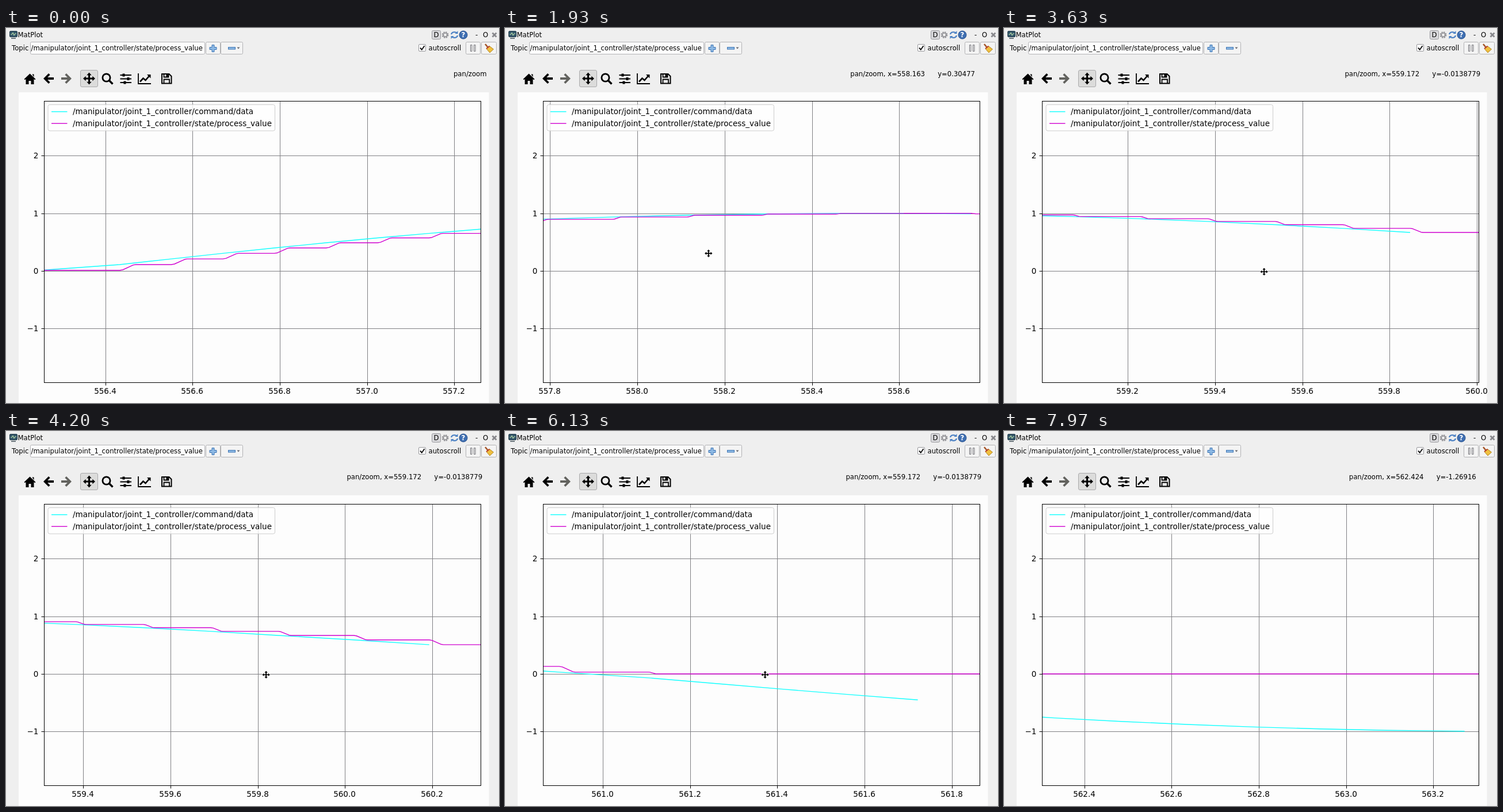
These frames come from a looping animation (857x653 px, 8 s). An HTML page:

```html
<!DOCTYPE html>
<html lang="en">
<head>
<meta charset="utf-8">
<title>MatPlot</title>
<style>
  html, body { margin: 0; width: 100%; height: 100%; overflow: hidden; background: #efefef; }
  svg { display: block; width: 857px; height: 653px; font: 11.65px "DejaVu Sans", sans-serif; }
  text { white-space: pre; }
  .plot { font-size: 13.5px; }
  .btn { fill: #f4f4f4; stroke: #b2b2b4; }
  .mid { text-anchor: middle; }
  .end { text-anchor: end; }
  .line { fill: none; stroke-width: 1.4; stroke-linejoin: round; }
  .cmd { stroke: #11ffff; }
  .val { stroke: #d000d0; }
  .grid { stroke: #808084; fill: none; }
  .axis { stroke: #000; fill: none; }
</style>
</head>
<body>
<svg viewBox="0 0 857 653">
  <defs>
    <clipPath id="area"><rect x="66" y="127" width="760" height="491"/></clipPath>
    <path id="move" d="M0-10.5L4.2-5.8H1.5V-1.5H5.8V-4.2L10.5 0L5.8 4.2V1.5H1.5V5.8H4.2L0 10.5L-4.2 5.8H-1.5V1.5H-5.8V4.2L-10.5 0L-5.8-4.2V-1.5H-1.5V-5.8H-4.2Z"/>
    <path id="arrow" d="M-9 0L0-9L2.6-6.4L-1.8-2H9V2H-1.8L2.6 6.4L0 9Z"/>
  </defs>
  <rect width="857" height="653" fill="#efefef"/>

  <!-- title bar -->
  <rect x="6.5" y="5.5" width="13" height="10" rx="1.5" fill="#35576b" stroke="#203a48"/>
  <path d="M8 11h2.5l1.5-3 2 5 1.5-3H18" fill="none" stroke="#c9efb0"/>
  <path d="M9 18h8" stroke="#4c5a62" stroke-width="1.6"/>
  <text x="20.5" y="16">MatPlot</text>
  <rect x="740.5" y="4.5" width="15" height="15" rx="2" fill="#d9d9dc" stroke="#98989c"/>
  <text class="mid" x="748" y="16.3">D</text>
  <g fill="none" stroke="#929296">
    <circle cx="763.5" cy="12" r="4.8" stroke-width="2.2" stroke-dasharray="2.4 1.37"/>
    <circle cx="763.5" cy="12" r="3.2" stroke-width="1.6"/>
  </g>
  <path d="M774 11a5.5 5 0 0 1 9.5-2.2M785 13a5.5 5 0 0 1-9.5 2.2" fill="none" stroke="#4d82c4" stroke-width="2.2"/>
  <path d="M785.5 5v5h-5zM773.5 19v-5h5z" fill="#4d82c4"/>
  <circle cx="795" cy="12" r="7" fill="#3f6fb2" stroke="#264f8c"/>
  <text class="mid" x="795" y="16.3" fill="#fff" font-weight="bold">?</text>
  <text class="mid" x="818" y="16">-</text>
  <text class="mid" x="833.5" y="16">O</text>
  <path d="M845.5 8.5l7 7m0-7l-7 7" stroke="#88888c" stroke-width="2.8"/>

  <!-- topic row -->
  <text x="10" y="39">Topic</text>
  <rect x="42.5" y="24.5" width="303" height="21" rx="2" fill="#fdfdfd" stroke="#b2b2b6"/>
  <text x="43.5" y="38.5">/manipulator/joint_1_controller/state/process_value</text>
  <rect class="btn" x="347.5" y="24.5" width="25" height="21" rx="2"/>
  <path d="M358 29.5h4v4h4v4h-4v4h-4v-4h-4v-4h4z" fill="#8db9e4" stroke="#3d74b4"/>
  <rect class="btn" x="373.5" y="24.5" width="38" height="21" rx="2"/>
  <rect x="386.5" y="33.5" width="12" height="3.5" fill="#8db9e4" stroke="#3d74b4"/>
  <path d="M401.5 33.5h5l-2.5 3z" fill="#66666a"/>
  <rect x="717.5" y="28.5" width="12" height="12" rx="1.5" fill="#fdfdfd" stroke="#98989c"/>
  <path d="M720 34.5l2.8 3.2L727.5 31" fill="none" stroke="#111" stroke-width="1.9"/>
  <text x="734.5" y="38.5">autoscroll</text>
  <rect class="btn" x="799.5" y="24.5" width="25" height="21" rx="2"/>
  <path d="M807.5 29.5h2.5v11h-2.5zM813.5 29.5h2.5v11h-2.5z" fill="#e8e8ea" stroke="#77777b"/>
  <rect class="btn" x="826.5" y="24.5" width="26" height="21" rx="2"/>
  <path d="M833 28l5 6" stroke="#a4562a" stroke-width="2.6"/>
  <path d="M835 36l5.5-4.5 7 5.5-6.5 6z" fill="#f0c040" stroke="#b08420"/>
  <path d="M835 36l5.5-4.5" stroke="#b8402c" stroke-width="2"/>

  <!-- plot toolbar -->
  <path d="M41.5 79.5L51.5 89l-1.3 1.3L48.5 89v9h-5v-6h-4v6h-5v-9l-1.7 1.3L31.5 89zM45.5 80.5h3v5z"/>
  <use href="#arrow" x="74" y="88"/>
  <use href="#arrow" transform="translate(105 88) scale(-1 1)" fill="#62625e"/>
  <rect x="129.5" y="73.5" width="30" height="29" rx="2.5" fill="#dcdcdb" stroke="#a9a9ab"/>
  <use href="#move" x="144.5" y="88"/>
  <g fill="none" stroke="#000">
    <circle cx="174.5" cy="86.5" r="6.6" stroke-width="2.8"/>
    <path d="M179.5 91.5l6 6" stroke-width="3.4"/>
    <path d="M198.5 82h19.5M198.5 88.5h19.5M198.5 95h19.5" stroke-width="2"/>
    <path d="M204.5 79.5v5M212.5 86v5M206.5 92.5v5" stroke-width="4"/>
    <path d="M230 79v18h22" stroke-width="1.8"/>
    <path d="M233 93.5l5.5-6 4 3.5 6.5-7.5" stroke-width="2.6"/>
    <path d="M271 80h12.5l4 4v12.5h-16.5z" stroke-width="2"/>
    <path d="M274.5 80v5.5h8V80M274.5 96v-6.5h9.5V96" stroke-width="1.8"/>
  </g>
  <path d="M245 81h6.5v6.5z"/>
  <rect x="278.5" y="80" width="4" height="5"/>
  <text id="status" class="end" x="835.5" y="84"></text>

  <!-- figure -->
  <rect x="22" y="112" width="817.5" height="541" fill="#fdfdfd"/>
  <g class="plot">
    <g id="rows"></g>
    <g clip-path="url(#area)">
      <path id="cols" class="grid"/>
      <path id="cmd" class="line cmd"/>
      <path id="val" class="line val"/>
    </g>
    <path id="ticks" class="axis"/>
    <rect class="axis" x="66.5" y="127.5" width="759" height="490"/>
    <g id="labels"></g>
    <rect x="73" y="133.5" width="394.5" height="45.5" rx="3" fill="#fff" fill-opacity=".8" stroke="#ccc"/>
    <path class="line cmd" d="M79 145.7h27.5"/>
    <path class="line val" d="M79 166.2h27.5"/>
    <text x="116" y="150.3">/manipulator/joint_1_controller/command/data</text>
    <text x="116" y="170.5">/manipulator/joint_1_controller/state/process_value</text>
  </g>
  <use id="cursor" href="#move" stroke="#fff" stroke-width="2.2" paint-order="stroke"/>
</svg>
<script>
const LOOP = 8000, REPAINT = 210;
const LEFT = 66.8, SPAN = 758.5, ZERO = 423, UNIT = 100.35, BOTTOM = -1.93;
const ENTER = 1300, REST = 3200, RESUME = 6400, LEAVE = 7800, GONE = 7930;
const $ = id => document.getElementById(id);
const py = v => ZERO - v * UNIT;
const snap = p => Math.round(p) + .5;

// key points: [ms, newest time on the axis]
const clock = [[-170, 557.2606], [830, 557.955], [1930, 558.7846], [REST, 559.664],
  [3630, 560.0043], [4870, 560.9246], [6130, 561.864], [7970, 563.304]];

// key points: [ms, fraction of axis width, data y]
const pointer = [[ENTER, .02, -2.3], [1930, .3784, .30477], [2000, .3784, .30477],
  [REST, .508, -.0138779], [RESUME, .508, -.0138779], [LEAVE, .28, -1.26916],
  [GONE, .2, -2.5]];

// key points: [command number, arrival time]
const pace = [[0, 556.25], [1, 556.433], [8, 557.2606], [15, 558.455], [24, 559.847],
  [26, 560.193], [30, 560.695], [32, 561.105], [36, 561.722], [45, 563.093], [47, 563.45]];

const segment = (keys, t) => {
  const i = keys.findIndex(k => k[0] > t);
  return i < 0 ? keys.length - 2 : Math.max(0, i - 1);
};

function sample(keys, t) {
  const i = segment(keys, t), a = keys[i], b = keys[i + 1];
  const k = Math.min(1, Math.max(0, (t - a[0]) / (b[0] - a[0])));
  return a.slice(1).map((v, j) => v + (b[j + 1] - v) * k);
}

// the axis advances in equal steps of about REPAINT ms between two key points
function rightEdge(t) {
  const i = segment(clock, t), [t0, r0] = clock[i], [t1, r1] = clock[i + 1];
  const steps = Math.round((t1 - t0) / REPAINT);
  const k = Math.min(1, Math.floor((t - t0) / (t1 - t0) * steps + 1e-6) / steps);
  return r0 + (r1 - r0) * k;
}

// a sampled sine; the joint follows each sample with a short ramp and stops at 0
const commands = Array.from({ length: 48 }, (_, n) => [sample(pace, n)[0], Math.sin(n / 10 + .01)]);

const toPath = pts => 'M' + pts.map(([x, v]) => x.toFixed(2) + ' ' + py(v).toFixed(2)).join('L');

function drawPlot(right) {
  const px = s => LEFT + (s - right + 1) * SPAN;
  const seen = commands.filter(c => c[0] <= right + 1e-6);
  let level = seen[0][1];
  const val = [[px(seen[0][0]), level]];
  for (const [s, v] of seen) {
    const goal = Math.max(0, v), d = goal - level;
    if (!d) continue;
    const dur = .01 + .27 * Math.abs(d);
    for (const [k, e] of [[0, 0], [.2, .1], [.85, .93], [1, 1]])
      val.push([px(s + k * dur), level + e * d]);
    level = goal;
  }
  val.push([LEFT + SPAN + 40, level]);
  $('cmd').setAttribute('d', toPath(seen.map(([s, v]) => [px(s), v])));
  $('val').setAttribute('d', toPath(val));

  let cols = '', ticks = '', labels = '';
  for (let n = Math.ceil((right - 1) * 5); n <= right * 5; n++) {
    const x = snap(px(n / 5));
    cols += `M${x} 127V617`;
    ticks += `M${x} 618v4.5`;
    labels += `<text class="mid" x="${x - 1}" y="637">${(n / 5).toFixed(1)}</text>`;
  }
  for (let v = -1; v <= 2; v++) ticks += `M66 ${snap(py(v))}h-4.5`;
  $('cols').setAttribute('d', cols);
  $('ticks').setAttribute('d', ticks);
  $('labels').innerHTML = labels;
}

function drawPointer(t) {
  const [fx, y] = sample(pointer, t);
  $('cursor').setAttribute('visibility', t >= ENTER && t < GONE ? 'visible' : 'hidden');
  $('cursor').setAttribute('transform',
    `translate(${LEFT + fx * SPAN} ${py(y)}) scale(.64)`);

  // the readout only follows while the pointer moves
  const m = t < RESUME ? Math.min(t, REST) : Math.min(t, LEAVE);
  const [mx, my] = sample(pointer, m);
  const pad = v => String(Number(v.toPrecision(6))).padEnd(12, '\u00a0');
  $('status').textContent = t >= ENTER && my > BOTTOM
    ? `pan/zoom, x=${pad(rightEdge(m) - 1 + mx)}\u00a0y=${pad(my)}` : 'pan/zoom';
}

for (let v = -1; v <= 2; v++) {
  const y = snap(py(v));
  $('rows').innerHTML += `<path class="grid" d="M66 ${y}H825"/>` +
    `<text class="end" x="56.3" y="${y + 4.5}">${String(v).replace('-', '\u2212')}</text>`;
}

const start = performance.now();
let painted;
function tick() {
  const t = (performance.now() - start) % LOOP;
  const right = rightEdge(t);
  if (right !== painted) drawPlot(painted = right);
  drawPointer(t);
  requestAnimationFrame(tick);
}
tick();
</script>
</body>
</html>
```
